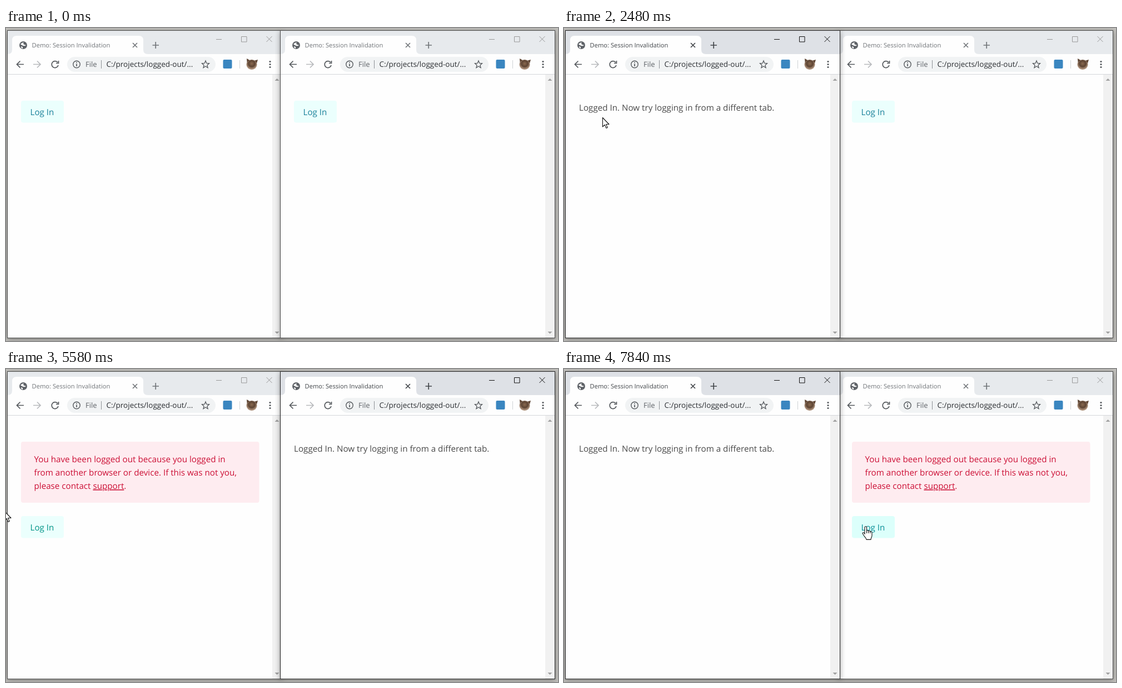
An HTML page for the animation above (8000 ms loop, 993 px wide and 564 px high).

```html
<!DOCTYPE html>
<html lang="en">
<head>
<meta charset="utf-8">
<title>Session invalidation demo</title>
<style>
html, body { margin: 0; width: 100%; height: 100%; overflow: hidden; background: #c3c2be; }
svg { display: block; }
text { font: 15.2px "Open Sans", "Noto Sans", sans-serif; text-rendering: geometricPrecision; white-space: pre; }
.line { fill: none; stroke: #55595d; stroke-width: 1.7; }

.win { --strip: #e7eaed; --title: #72767a; --controls: #999; --edge: #4a4a4a; }
.win.active { --strip: #dee1e6; --title: #43474b; --controls: #111; --edge: #222; }
.frame { fill: #fefefe; filter: drop-shadow(0 2px 5px rgba(0, 0, 0, .38)); }
.edge { fill: none; stroke: var(--edge); }
.strip { fill: var(--strip); }
.title { font-size: 11.2px; fill: var(--title); }
.tab-icons { stroke: var(--title); }
.controls { fill: none; stroke: var(--controls); }

.view { display: none; }
[data-view=login] .login, [data-view=logged] .logged, [data-view=notice] .notice { display: inline; }
.logged text { fill: #4a4a4a; }
.alert { fill: #cc0f35; }
.button rect { fill: #ebfffd; }
.button text { fill: #1b819a; }
.notice .button text { fill: #009487; }
.hover .button rect { fill: #dcfffb; }
.hover .button text { fill: #0a9098; }
#pointer path { fill: #fff; stroke: #111; stroke-width: 1.1; stroke-linejoin: round; }
</style>
</head>
<body>
<svg id="stage" width="993" height="564">
  <defs>
    <radialGradient id="fur" cx=".5" cy=".4">
      <stop offset="0" stop-color="#8a6a50"/>
      <stop offset=".6" stop-color="#5d4433"/>
      <stop offset="1" stop-color="#a88c76"/>
    </radialGradient>
  </defs>
  <g id="windows"></g>
  <g id="pointer">
    <circle id="press" r="12" fill="#f2e93c" opacity=".72"/>
    <path id="arrow" d="M.5.5V17l3.8-3.6 2.6 6 2.4-1-2.6-5.9H12z"/>
    <path id="hand" d="M-2 14V1.5C-2-.8 1.5-.8 1.5 1.5V8C1.5 6.2 4.7 6.2 4.7 8.4 4.7 7 7.9 7 7.9 9.4 8 8.2 11 8.2 11 11V16C11 19 9 20 9 23.4H1C1 21-1.500 19-3.300 16.500L-5.500 13C-6.800 11-4.200 10-3 11.500L-2 13M1.500 8V12M4.700 8.500V12M7.900 9.500V12"/>
  </g>
</svg>
<script>
const LOOP = 8000, SHIFT = 491;
const $ = id => document.getElementById(id);

const button = y => `<g class="button"><rect x="27" y="${y}" width="77" height="39.500" rx="4"/>
  <text x="43.500" y="${y + 26}">Log In</text></g>`;

const browser = x => `<g class="win" transform="translate(${x})">
  <rect class="frame" x="2" y="4" width="495" height="555"/>
  <path class="strip" d="M3 5H496V47H3z"/>
  <path fill="#fefefe" d="M3 47Q11 47 11 39V22Q11 14 19 14H239Q247 14 247 22V39Q247 47 255 47z"/>
  <circle cx="31" cy="31" r="7" fill="#5f6368"/>
  <path d="M26 29Q29 26 32 26Q30 29 33 30L36 31Q34 33 31 32T26 29M27 33L30 34L30 37Q27 36 27 33" fill="#fff"/>
  <text class="title" x="46.500" y="35">Demo: Session Invalidation</text>
  <path class="line tab-icons" d="M228 27L236 35M236 27L228 35M263.500 31H275M269.200 25V37"/>
  <path class="controls" d="M378 20.500H388M423.500 15.500H433V25H423.500zM468.500 15L478.500 25M478.500 15L468.500 25"/>

  <path class="line" d="M32 65.500H19.500M25.500 59.500L19.500 65.500L25.500 71.500"/>
  <path class="line" style="stroke:#b8babd" d="M49 65.500H62M56 59.500L62 65.500L56 71.500"/>
  <path class="line" d="M93 62A6 6 0 1 0 94 67M94.500 59V63.500H90"/>
  <rect x="110" y="52" width="267" height="27" rx="13.500" fill="#f1f3f4"/>
  <circle class="line" cx="127" cy="65.500" r="6.200" style="stroke-width:1.400"/>
  <path class="line" d="M127 64.500V69M127 61.500V63"/>
  <text x="143" y="70" style="font-size:13px" fill="#5f6368">File</text>
  <path d="M171.500 58V73" stroke="#8d9196"/>
  <text x="180.500" y="70" style="font-size:13.500px" fill="#2c2f33">C:/projects/logged-out/...</text>
  <path class="line" style="stroke-width:1.300" d="M359 59L360.800 63.400L365.500 63.800L361.900 66.900L363 71.500L359 69L355 71.500L356.100 66.900L352.500 63.800L357.200 63.400z"/>
  <rect x="390.500" y="57" width="16" height="16" rx="2" fill="#3a86c0"/>
  <path d="M420.500 58V73" stroke="#d0d3d6"/>
  <path d="M433 55L440 59H446L453 57L450 67H434z" fill="#5d4433"/>
  <ellipse cx="442" cy="66" rx="9.500" ry="9" fill="url(#fur)"/>
  <g fill="#55595d"><circle cx="475" cy="60.500" r="1.600"/><circle cx="475" cy="65.500" r="1.600"/><circle cx="475" cy="70.500" r="1.600"/></g>
  <path d="M3 83.500H496" stroke="#d5d7da"/>
  <path d="M479 84H496V558H479z" fill="#f1f1f1"/>
  <path d="M483.500 95L487.500 91L491.500 95zM483.500 547L487.500 551L491.500 547z" fill="#a0a0a0"/>

  <g class="view login">${button(131)}</g>
  <g class="view logged"><text x="27" y="149">Logged In. Now try logging in from a different tab.</text></g>
  <g class="view notice">
    <rect x="27" y="131" width="428.500" height="110" rx="4" fill="#feecf0"/>
    <text class="alert" x="50.500" y="168">You have been logged out because you logged in</text>
    <text class="alert" x="50.500" y="192">from another browser or device. If this was not you,</text>
    <text class="alert" x="50.500" y="216">please contact <tspan text-decoration="underline">support</tspan>.</text>
    ${button(265)}
  </g>
  <rect class="edge" x="2.500" y="4.500" width="494" height="554"/>
</g>`;

$('windows').innerHTML = browser(0) + browser(SHIFT);
const [left, right] = $('windows').children;

// Pointer stops: time, x, y; "out" settles slowly, "in-out" is a full sweep.
const stops = [
  [0, 745, 570], [190, 745, 570], [660, 99, 176, 'in-out'], [930, 194, 248, 'in-out'],
  [1210, 194, 248], [1840, 69, 161, 'out'],
  [2720, 69, 161], [2900, 330, 188, 'in'], [3150, 571, 157, 'out'],
  [5260, 571, 157], [5430, -4, 256, 'in-out'],
  [5580, -4, 256], [5810, 75, 287, 'out'],
  [6790, 75, 287], [6930, 421, 278], [7590, 529, 284, 'out'],
  [7620, 529, 284], [7840, 543, 284, 'out'], [LOOP, 543, 284]
];
const eases = {
  in: u => u ** 1.5,
  out: u => 1 - (1 - u) ** 2,
  'in-out': u => u * u * (3 - 2 * u)
};
const views = {
  left: [[0, 'login'], [2430, 'logged'], [4620, 'notice'], [6400, 'logged']],
  right: [[0, 'login'], [4420, 'logged'], [6450, 'notice']]
};
const presses = [[2380, 2480], [4340, 4460], [6350, 6450]];

const viewAt = (list, t) => list.findLast(([start]) => t >= start)[1];

function pointerAt(t) {
  const i = stops.findIndex(s => s[0] > t);
  const [t0, x0, y0] = stops[i - 1], [t1, x1, y1, ease] = stops[i];
  let u = (t - t0) / (t1 - t0);
  if (ease) u = eases[ease](u);
  return [x0 + (x1 - x0) * u, y0 + (y1 - y0) * u];
}

function update(win, view, active, x, y) {
  const top = { login: 131, notice: 265 }[view];
  const hover = x >= 27 && x <= 104 && y >= top && y <= top + 39.5;
  win.dataset.view = view;
  win.classList.toggle('active', active);
  win.classList.toggle('hover', hover);
  return hover;
}

function draw(t) {
  const [x, y] = pointerAt(t);
  const leftActive = t >= 2380 && t < 4340 || t >= 6350;
  const rightActive = t >= 4340 && t < 6350;
  const overLeft = update(left, viewAt(views.left, t), leftActive, x, y);
  const overRight = update(right, viewAt(views.right, t), rightActive, x - SHIFT, y);
  const front = leftActive ? left : right;
  if ($('windows').lastChild !== front) $('windows').append(front);

  const hand = overLeft || overRight;
  $('pointer').setAttribute('transform', `translate(${Math.round(x)} ${Math.round(y)})`);
  $('hand').style.display = hand ? '' : 'none';
  $('arrow').style.display = hand ? 'none' : '';
  $('press').style.display = presses.some(([a, b]) => t >= a && t < b) ? '' : 'none';
}

function tick() {
  draw(performance.now() % LOOP);
  requestAnimationFrame(tick);
}
tick();
</script>
</body>
</html>
```
